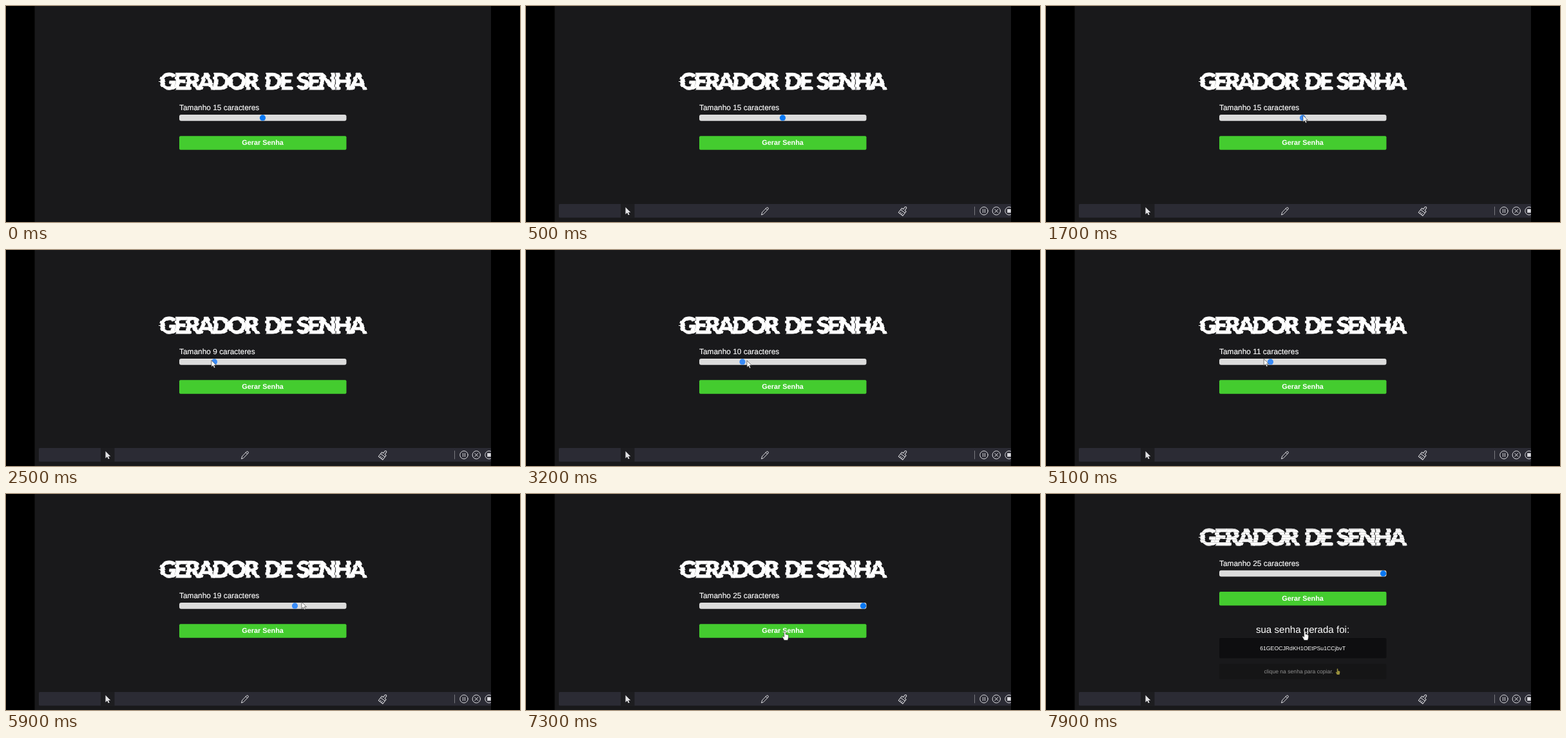
Animation of 798x336 px, one loop 8 s. Source, as an HTML page:

```html
<!DOCTYPE html>
<html lang="pt">
<head>
<meta charset="utf-8">
<title>Gerador de senha</title>
<style>
  html, body { margin: 0; width: 100%; height: 100%; overflow: hidden; background: #000; }
  svg { display: block; width: 100vw; height: 100vh; }
  text { font-family: "Liberation Sans", Arial, sans-serif; fill: #fff; text-rendering: geometricPrecision; }
  .title text { font: 900 35.5px Lato, sans-serif; letter-spacing: -3.2px; }
  .mid { text-anchor: middle; }
  .line { fill: none; stroke: #dcdce0; stroke-width: 1; stroke-linejoin: round; stroke-linecap: round; }
</style>
</head>
<body>
<svg viewBox="0 0 798 336">
  <defs>
    <g id="words" class="title" stroke="#fff" stroke-width=".8">
      <text x="238.5" y="130">GERADOR</text>
      <text x="401.3" y="130">DE</text>
      <text x="451.5" y="130">SENHA</text>
    </g>
    <path id="finger" d="M-1.3 .9q1.2-1.7 2.4 0v4.3l3.4.8q1.3.4 1.2 1.8l-.5 4-.9 2.7h-5.4l-2.8-5q-.5-1.6.8-1.6l1.8 1.5z"/>
    <clipPath id="panel"><rect x="44.5" width="708.5" height="336"/></clipPath>
  </defs>

  <rect width="798" height="336"/>
  <rect x="44.5" width="708.5" height="336" fill="#19191b"/>

  <g id="form">
    <g id="title"></g>
    <text id="label" x="269" y="161.8" font-size="11.9" stroke="#fff" stroke-width=".15"></text>
    <rect x="269" y="169" width="259.5" height="9.8" rx="3" fill="#dcdcdc"/>
    <circle id="thumb" cy="173.9" r="4.6"/>
    <rect x="269" y="202.2" width="259.5" height="21.5" rx="2" fill="#44cc2f"/>
    <text class="mid" x="398.6" y="216.3" font-size="10.85" font-weight="700">Gerar Senha</text>
  </g>

  <g id="result">
    <text class="mid" x="398.5" y="216" font-size="15.1">sua senha gerada foi:</text>
    <rect x="269" y="224" width="259.5" height="31.5" rx="2" fill="#0e0e10"/>
    <text class="mid" x="398.6" y="243" font-size="8.7">61GEOCJRdKH1OEtPSu1CCjbvT</text>
    <g id="hint">
      <rect x="269" y="264" width="259.5" height="24" rx="2" fill="#151516"/>
      <text x="338.5" y="279.3" font-size="8.6" style="fill:#929292">clique na senha para copiar.</text>
      <use href="#finger" transform="translate(452.6 271.5) scale(.66)" fill="#99903c"/>
    </g>
  </g>

  <g id="bar" clip-path="url(#panel)">
    <rect x="51" y="308" width="710" height="21.3" rx="1.5" fill="#2b2b34"/>
    <rect x="147" y="308" width="21.5" height="21.3" fill="#1d1d20"/>
    <path d="M154.5 313v11l2.6-2.4 1.8 3.7 1.8-.9-1.8-3.5h3.4z" fill="#e4e4e6"/>
    <g class="line">
      <path d="M365.6 324.6l1-3.6 7-7.4q1.2-.8 2.2.2t.2 2.2l-7 7.4zM372.2 315l2.6 2.5"/>
      <path transform="translate(585.6 318.6) rotate(38)"
        d="M-1.5-2v-4.5q1.5-2 3 0v4.5h2.7v3h-8.4v-3zM-4.2 1v5.6h8.4v-5.6M-1.4 6.4v-2.6M1.4 6.4v-2.6"/>
      <path d="M696.5 312.5v12.5" stroke="#77777e"/>
      <circle cx="711" cy="318.8" r="6.2"/>
      <circle cx="730.3" cy="318.8" r="6.2"/>
      <circle cx="750" cy="318.8" r="6.2"/>
      <path d="M709.6 316.2v5.2M712.5 316.2v5.2M727.8 316.3l5 5M732.8 316.3l-5 5"/>
    </g>
    <rect x="747.2" y="316" width="5.6" height="5.6" fill="#dcdce0"/>
  </g>

  <g id="cursor" stroke="#222" stroke-width=".6" fill="#fff" stroke-linejoin="round">
    <path id="arrow" d="M0 0v10.4l2.4-2.2 1.7 3.8 1.7-.8-1.7-3.6h3.3z"/>
    <use id="hand" href="#finger"/>
  </g>
</svg>

<script>
const LOOP = 8000, STEP = 100, LAG = 60;
const MIN = 5, MAX = 25, LEFT = 273.5, NOTCH = 12.5;
const $ = id => document.getElementById(id);
const clamp = (v, lo, hi) => Math.min(hi, Math.max(lo, v));

// Torn title: strips shifted sideways by a wave, plus a few stray slivers
function tornTitle() {
  let seed = 7, out = '';
  const rnd = () => (seed = seed * 16807 % 2147483647) / 2147483647;
  for (let i = 0; i < 8; i++) {
    const y = 102 + i * 4;
    out += `<clipPath id="s${i}"><rect x="220" y="${y}" width="360" height="4"/></clipPath>
      <g clip-path="url(#s${i})"><use href="#words" x="${Math.sin(i * 2.3).toFixed(2)}"/></g>`;
  }
  for (let x = 237; x < 555; x += 30 + rnd() * 25)
    out += `<rect x="${x}" y="${117 + rnd() * 10}" width="${5 + rnd() * 6}" height="1" fill="#fff"/>`;
  return out;
}
$('title').innerHTML = tornTitle();

// Pointer moves: [start, end, x, y]
const home = [402, 177];
const moves = [
  [1200, 1500, 399, 170], [1700, 2700, 299, 172], [2800, 3200, 343, 172],
  [3200, 4000, 469.5, 167], [4600, 5200, 312, 170], [5200, 5900, 459, 168],
  [5900, 6600, 524, 170], [6800, 7300, 402, 213]];

function pointer(t) {
  let [x, y] = home;
  for (const [from, to, mx, my] of moves) {
    const p = clamp((t - from) / (to - from), 0, 1);
    x += (mx - x) * p;
    y += (my - y) * p;
  }
  return [x, y];
}

// The thumb trails the pointer slightly until it is released
function size(t) {
  const [x] = pointer(Math.min(t - LAG, 6800));
  return clamp(Math.round(MIN + (x - LEFT) / NOTCH), MIN, MAX);
}

const show = (id, on) => $(id).setAttribute('visibility', on ? 'visible' : 'hidden');

function draw(t) {
  const n = size(t), [x, y] = pointer(t), done = t >= 7700;
  const onButton = y > 202;
  $('label').textContent = `Tamanho ${n} caracteres`;
  $('thumb').setAttribute('cx', LEFT + (n - MIN) * NOTCH);
  $('thumb').setAttribute('fill', t >= 1400 && t < 6900 ? '#3a8cf8' : '#0878f4');
  $('form').setAttribute('transform', `translate(0 ${done ? -50.2 : 0})`);
  $('cursor').setAttribute('transform', `translate(${x} ${y})`);
  $('hint').setAttribute('opacity', clamp((t - 7600) / 300, 0, 1));
  show('result', done);
  show('bar', t >= 100);
  show('arrow', t >= 1000 && !onButton);
  show('hand', onButton);
}

const start = performance.now();
function tick() {
  const t = (performance.now() - start) % LOOP;
  draw(Math.floor(t / STEP) * STEP);
  requestAnimationFrame(tick);
}
tick();
</script>
</body>
</html>
```
